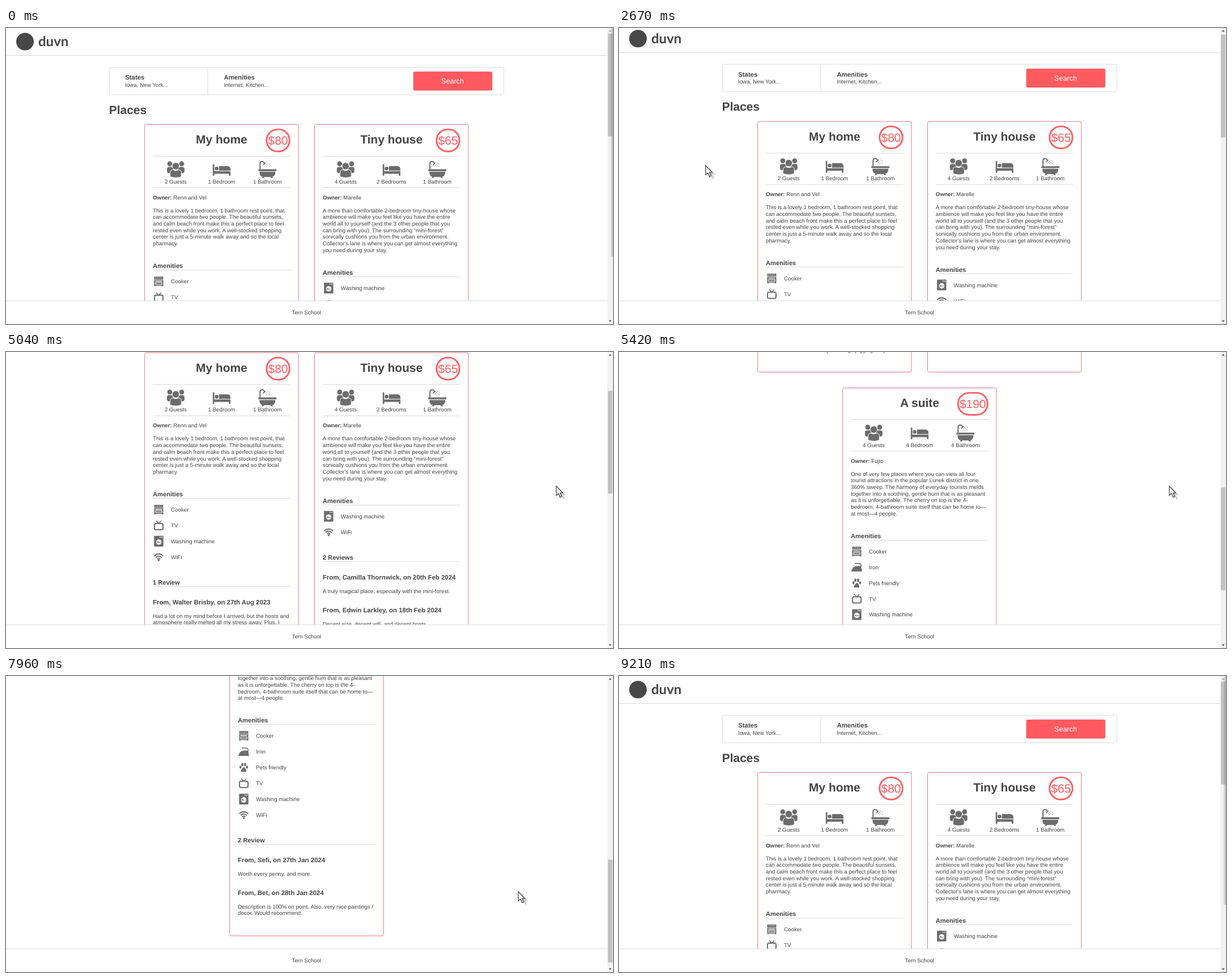
These frames come from a looping animation (1071 by 523 pixels, 9880 ms). An HTML page:

```html
<!DOCTYPE html>
<html lang="en">
<head>
<meta charset="utf-8">
<title>Places</title>
<style>
html, body { margin: 0; width: 100%; height: 100%; overflow: hidden; background: #fff; }
svg { display: block; font-family: "Liberation Sans", Arial, sans-serif; text-rendering: geometricPrecision; }
text { fill: #444; white-space: pre; }
.b { font-weight: bold; }
.m { text-anchor: middle; }
.line { stroke: #d8d8d8; }
.box { fill: #fff; stroke: #ddd; }
.card { fill: none; stroke: #dc6a74; stroke-width: .9; }
.red { fill: #ff5a5f; }
.icon { fill: #6c6c6c; }
.wire { fill: none; stroke: #6c6c6c; stroke-width: 2; }
.cut { fill: #fff; }
</style>
</head>
<body>
<svg id="stage" width="1071" height="523" viewBox="0 0 1071 523">
<defs>
  <linearGradient id="fade"><stop offset="0" stop-opacity="0"/><stop offset="1" stop-opacity=".25"/></linearGradient>
  <filter id="blur"><feGaussianBlur stdDeviation=".6"/></filter>
  <path id="arrow" d="M0 0V16.5L3.8 13L6.8 19.6L9.5 18.4L6.6 12H11.3Z"/>
  <g id="guests" class="icon">
    <circle cx="-10.5" cy="-9.5" r="4.4"/><circle cx="10.5" cy="-9.5" r="4.4"/>
    <rect x="-15.5" y="-4" width="11" height="11" rx="4"/><rect x="4.5" y="-4" width="11" height="11" rx="4"/>
    <g stroke="#fff"><circle cy="-5.5" r="6.3"/><path d="M-10 13V7Q-10 1 -5 1Q0 4 5 1Q10 1 10 7V13Q0 17 -10 13Z"/></g>
  </g>
  <g id="bed" class="icon">
    <path d="M-15.5 -9H-12.8V3.5H15.7V11.5H13V8H-12.8V11.5H-15.5Z"/>
    <circle cx="-8.7" cy="-1.2" r="3.3"/><path d="M-4.5 2.5V-5.5H10.5Q15.7 -5 15.7 0V2.5Z"/>
  </g>
  <g id="bath" class="icon">
    <rect x="-16" y="0" width="32" height="3.4" rx="1"/>
    <path d="M-14 4.6H14Q14 12.5 8.5 13.5L10 15.5H7L5.5 13.8H-5.5L-7 15.5H-10L-8.5 13.5Q-14 12.5 -14 4.6Z"/>
    <path class="wire" d="M-13 0V-9.5Q-13 -13.5 -9.5 -13.5Q-6 -13.5 -5 -10"/>
    <path d="M-8 -6Q-8 -11.5 -2 -11.5Z"/>
    <path class="wire" style="stroke-width:1;stroke-dasharray:1.5 1.5" d="M-4 -7L0 -3M-2 -9L4 -4M0 -11L4 -9"/>
  </g>
  <g id="cooker" class="icon">
    <path d="M-8 -8.5H8V-3.8H-8ZM-8 -3H8V8.5H5.5V7.5H-5.5V8.5H-8Z"/>
    <path class="cut" d="M-6 -1.2H6V.2H-6ZM-6 1.6H6V5.8H-6Z"/>
    <path d="M-5 2.6H5V4.8H-5Z"/>
    <path d="M-5.5 -6.2H5.5" stroke="#fff" stroke-width="1.2" stroke-dasharray="1.2 2"/>
  </g>
  <g id="tv"><rect class="wire" x="-7.5" y="-3.5" width="15" height="11" rx="2.5"/><path class="wire" style="stroke-width:1.5" d="M-4.5 -8L0 -3.5L4.5 -8"/></g>
  <g id="washer" class="icon">
    <rect x="-8.2" y="-9.5" width="16.4" height="19" rx="1"/>
    <circle class="cut" cy="1.5" r="4.8"/><path d="M-3.8 1Q-2 -.2 0 1T3.8 1V2.4H-3.8Z"/>
    <circle class="cut" cx="2.5" cy="-7" r="1"/><circle class="cut" cx="5.7" cy="-7" r="1"/>
  </g>
  <g id="wifi"><path class="wire" d="M-8 -1.8Q0 -9 8 -1.8M-5.4 1Q0 -4 5.4 1M-2.8 3.6Q0 1 2.8 3.6"/><circle class="icon" cy="5.6" r="1.7"/></g>
  <g id="iron" class="icon"><path d="M-9.5 7.5Q-8 -2 1 -2H7.5L9.5 7.5Z"/><path class="wire" style="stroke-width:1.5" d="M-3.5 -6.5H5Q7.3 -6.5 8 -1"/></g>
  <g id="paw" class="icon">
    <ellipse cx="-5.8" cy="-.6" rx="1.8" ry="2.7"/><ellipse cx="5.8" cy="-.6" rx="1.8" ry="2.7"/>
    <ellipse cx="-2.4" cy="-5" rx="1.9" ry="3"/><ellipse cx="2.4" cy="-5" rx="1.9" ry="3"/>
    <path d="M0 -.5Q2 -.5 3.5 3T4.5 7.5Q3 9 0 7.2Q-3 9 -4.5 7.5T-3.5 3T0 -.5Z"/>
  </g>
</defs>
<g id="page"></g>
<g id="fixed"></g>
<rect id="thumb" x="1062" y="10" width="8" height="181.5" fill="#c1c1c1"/>
<rect id="shade" x="1066" width="5" height="404" fill="url(#fade)"/>
<g id="cursor">
  <use href="#arrow" x="5.5" y="4" fill="#bbb" opacity=".75" filter="url(#blur)"/>
  <use href="#arrow" fill="#fff" stroke="#3a3a3a" stroke-width="1.2"/>
</g>
</svg>
<script>
const $ = id => document.getElementById(id);
const LOOP = 9880, LEAD = 11.72, BODY = 9.76, H2 = 11.16, H3 = 11.42, H1 = 20.92;

// y is the middle of the capitals
const text = (x, y, s, size = BODY, cls = '') =>
  `<text x="${x}" y="${y + size * .358}" font-size="${size}" class="${cls}">${s}</text>`;
const rule = (x, y, w) => `<path class="line" d="M${x} ${y}h${w}"/>`;
const icon = (name, x, y) => `<use href="#${name}" x="${x}" y="${y}"/>`;

const amenityIcons = { 'Cooker': 'cooker', 'TV': 'tv', 'Washing machine': 'washer', 'WiFi': 'wifi', 'Iron': 'iron', 'Pets friendly': 'paw' };

function card(x, top, height, p) {
  const left = x + 14.3, width = 242.7, right = left + width, mid = left + width / 2;
  const heading = (y, s) => text(left, y, s, H2, 'b') + rule(left, y + 7.6, width);
  const priceW = p.price.length * .556 * H1 + 8.4;
  let out = `<rect class="card" x="${x}" y="${top}" width="271.3" height="${height}" rx="3"/>`
    + text(mid, top + 26.4, p.title, H1, 'b m')
    + `<rect x="${right - priceW + 1.4}" y="${top + 8.6}" width="${priceW - 2.8}" height="39" rx="19.5" fill="none" stroke="#ff5a5f" stroke-width="2.8"/>`
    + text(right - priceW / 2, top + 28.2, p.price, H1, 'm red')
    + rule(left, top + 56, width) + rule(left, top + 111.5, width);
  ['guests', 'bed', 'bath'].forEach((name, i) => {
    const cx = left + (i + .5) * width / 3;
    out += icon(name, cx, top + 79) + text(cx, top + 100.7, p.info[i], BODY, 'm');
  });
  out += text(left, top + 128.6, `<tspan class="b">Owner:</tspan> ${p.owner}`);

  let y = top + 151.6;
  const lines = list => list.forEach((s, i) => {
    if (i) y += LEAD;
    out += text(left, y, s);
  });
  lines(p.about);
  out += heading(y += 39.5, 'Amenities');
  p.amenities.forEach((s, i) => {
    y += i ? 27.9 : 27.5;
    out += icon(amenityIcons[s], left + 10.5, y) + text(left + 32, y, s);
  });
  out += heading(y += 44.6, p.count);
  p.reviews.forEach(([from, ...body], i) => {
    out += text(left, y += i ? 33.6 : 35, 'From, ' + from, H3, 'b');
    y += 24.4;
    lines(body);
  });
  return out;
}

$('page').innerHTML =
  '<circle cx="33.5" cy="24" r="15.5" fill="#484848"/>'
  + '<text class="b" x="57" y="32" font-size="24" style="font-family:Lato,sans-serif">duvn</text>'
  + rule(0, 48.5, 1061)
  + '<rect class="box" x="182.5" y="69.5" width="696" height="48.5" rx="3"/>'
  + '<path class="line" d="M356 70v48"/>'
  + text(210.2, 87.2, 'States', H3, 'b') + text(210.2, 100.2, 'Iowa, New York...')
  + text(384.4, 87.2, 'Amenities', H3, 'b') + text(384.4, 100.2, 'Internet, Kitchen...')
  + '<g id="search"><rect class="red" x="718.5" y="77" width="139.5" height="33.5" rx="2.8"/>'
  + text(788, 93.8, 'Search', 12.55, 'm cut') + '</g>'
  + text(181.8, 144.2, 'Places', H1, 'b')
  + card(244.7, 170.5, 527.2, {
    title: 'My home', price: '$80', info: ['2 Guests', '1 Bedroom', '1 Bathroom'], owner: 'Renn and Vel',
    about: ['This is a lovely 1 bedroom, 1 bathroom rest point, that', 'can accommodate two people. The beautiful sunsets,',
      'and calm beach front make this a perfect place to feel', 'rested even while you work. A well-stocked shopping',
      'center is just a 5-minute walk away and so the local', 'pharmacy.'],
    amenities: ['Cooker', 'TV', 'Washing machine', 'WiFi'],
    count: '1 Review',
    reviews: [['Walter Brisby, on 27th Aug 2023', 'Had a lot on my mind before I arrived, but the hosts and',
      'atmosphere really melted all my stress away. Plus, I', 'even found a brand new place to go jogging daily.']]
  })
  + card(544.5, 170.5, 527.2, {
    title: 'Tiny house', price: '$65', info: ['4 Guests', '2 Bedrooms', '1 Bathroom'], owner: 'Marelle',
    about: ['A more than comfortable 2-bedroom tiny-house whose', 'ambience will make you feel like you have the entire',
      'world all to yourself (and the 3 other people that you', 'can bring with you). The surrounding "mini-forest"',
      'sonically cushions you from the urban environment.', "Collector's lane is where you can get almost everything",
      'you need during your stay.'],
    amenities: ['Washing machine', 'WiFi'],
    count: '2 Reviews',
    reviews: [['Camilla Thornwick, on 20th Feb 2024', 'A truly magical place, especially with the mini-forest.'],
      ['Edwin Larkley, on 18th Feb 2024', 'Decent size, decent wifi, and decent hosts.']]
  })
  + card(394.7, 725.7, 642.3, {
    title: 'A suite', price: '$190', info: ['4 Guests', '4 Bedroom', '4 Bathroom'], owner: 'Fujio',
    about: ['One of very few places where you can view all four', 'tourist attractions in the popular Lunek district in one',
      '360% sweep. The harmony of everyday tourists melds', 'together into a soothing, gentle hum that is as pleasant',
      'as it is unforgettable. The cherry on top is the 4-', 'bedroom, 4-bathroom suite itself that can be home to—',
      'at most—4 people.'],
    amenities: ['Cooker', 'Iron', 'Pets friendly', 'TV', 'Washing machine', 'WiFi'],
    count: '2 Review',
    reviews: [['Sefi, on 27th Jan 2024', 'Worth every penny, and more.'],
      ['Bet, on 28th Jan 2024', 'Description is 100% on point. Also, very nice paintings /', 'decor. Would recommend.']]
  });

$('fixed').innerHTML =
  '<path fill="#fff" d="M0 482H1061V523H0Z"/>' + rule(0, 482, 1061)
  + text(530.3, 503, 'Tern School', BODY, 'm')
  + '<path fill="#f1f1f1" d="M1061 0H1071V523H1061Z"/>'
  + '<path id="up" d="M1063.5 6.5L1066 3.5L1068.5 6.5Z"/><path id="down" d="M1063.5 516.5L1066 519.5L1068.5 516.5Z"/>';

const BOTTOM = 930;
const easeOut = u => 1 - (1 - u) ** 2;
const easeInOut = u => u < .5 ? 2 * u * u : 1 - 2 * (1 - u) ** 2;
const sine = u => (1 - Math.cos(Math.PI * u)) / 2;

// start, end, distance, easing
const scrolls = [
  [2630, 2990, 167.5, sine],
  [5040, 5819, 669.5, easeOut],
  [7430, 7780, BOTTOM - 837, easeInOut],
  [7897, 8497, -BOTTOM, easeInOut]
];
// time, x, y
const moves = [
  [130, 1078, 443], [1060, 32, 26], [1130, 32, 26], [1560, 840, 84], [1650, 840, 84], [2080, 520, 484],
  [2130, 520, 484], [2580, 153, 243], [3130, 153, 243], [3830, 357, 349], [4080, 561, 330], [4130, 561, 330],
  [4690, 971, 237], [5830, 971, 237], [6020, 780, 230], [6300, 560, 25], [6630, 466, 195], [7000, 600, 440],
  [7040, 600, 440], [7400, 904, 381], [8480, 904, 381], [8860, 1078, 350]
];
const clamp = u => Math.min(1, Math.max(0, u));

function pointer(t) {
  const i = moves.findIndex(m => m[0] > t);
  if (i < 1) return [1078, 400];
  const [t0, x0, y0] = moves[i - 1], [t1, x1, y1] = moves[i];
  const u = sine((t - t0) / (t1 - t0));
  return [x0 + (x1 - x0) * u, y0 + (y1 - y0) * u];
}

function draw() {
  const t = performance.now() % LOOP;
  const scroll = scrolls.reduce((sum, [a, b, d, ease]) => sum + d * ease(clamp((t - a) / (b - a))), 0);
  const [x, y] = pointer(t);
  const hover = x > 718 && x < 858 && y + scroll > 77 && y + scroll < 110;
  $('page').setAttribute('transform', `translate(0 ${-scroll})`);
  $('thumb').setAttribute('y', 10 + scroll * .3463);
  $('cursor').setAttribute('transform', `translate(${x} ${y})`);
  $('search').setAttribute('opacity', hover ? .9 : 1);
  $('up').setAttribute('fill', scroll < .5 ? '#a3a3a3' : '#505050');
  $('down').setAttribute('fill', scroll > BOTTOM - .5 ? '#a3a3a3' : '#505050');
  $('shade').setAttribute('opacity', t < 130 || t >= 9210 ? 1 : 0);
  requestAnimationFrame(draw);
}
draw();
</script>
</body>
</html>
```
